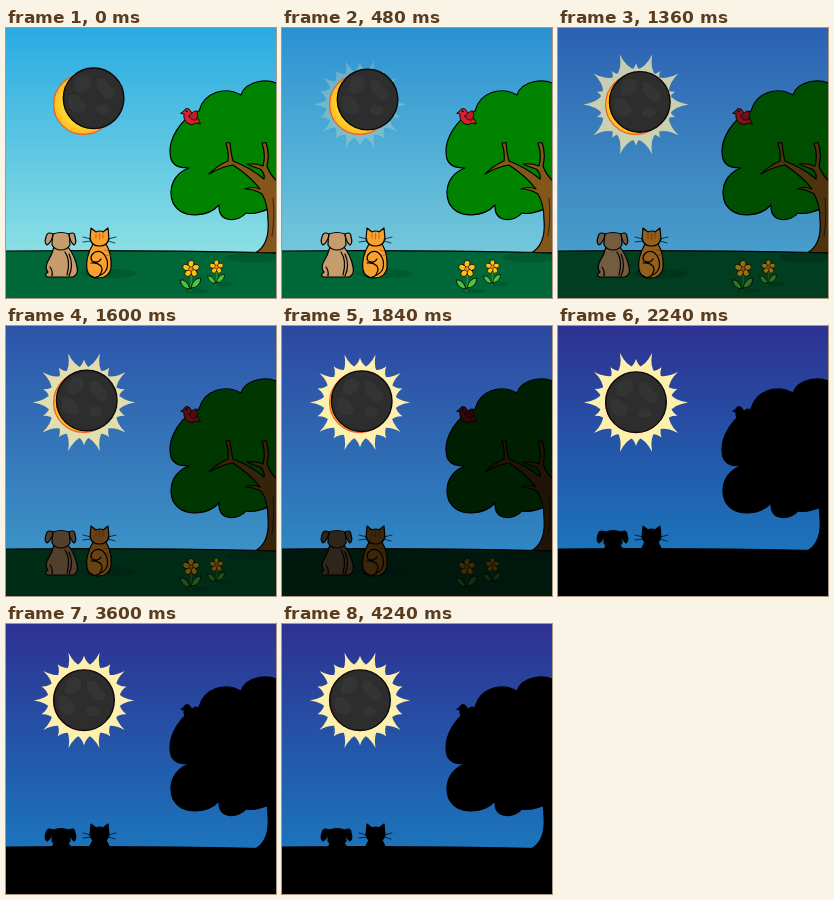
These frames come from a looping animation (270x270 px, 4.32 s). An HTML page:

```html
<!DOCTYPE html>
<html lang="en">
<head>
<meta charset="utf-8">
<title>Eclipse</title>
<style>
html, body { margin: 0; height: 100%; overflow: hidden; background: #000; }
svg { display: block; width: 100vw; height: 100vh; }
#land { stroke: #000; stroke-width: 1.2; stroke-linejoin: round; stroke-linecap: round; }
.shade { fill: #005a30; stroke: none; }
.line { fill: none; }
.dog { fill: #c69c6d; }
.cat { fill: #f9a12f; }
.stripe { fill: none; stroke: #d9691a; }
.leaf { fill: #4cc43c; stroke-width: .8; }
.petal { fill: #fcc21b; stroke-width: .7; }
</style>
</head>
<body>
<svg viewBox="0 0 270 270">
  <defs>
    <linearGradient id="daySky" x2="0" y2="1">
      <stop stop-color="#29abe2"/><stop offset="1" stop-color="#8cdfe3"/>
    </linearGradient>
    <linearGradient id="nightSky" x2="0" y2="1">
      <stop stop-color="#2e3192"/><stop offset="1" stop-color="#1b75bc"/>
    </linearGradient>
    <radialGradient id="sunFill">
      <stop offset=".75" stop-color="#ffd52b"/><stop offset="1" stop-color="#ffb81f"/>
    </radialGradient>
    <path id="ray" d="M-10-33Q-2-38 0-52Q2-38 10-33Z"/>
    <path id="spike" d="M-9-33Q-2-36 0-43.500Q2-36 9-33Z"/>
    <g id="flower">
      <path class="line" d="M0 4Q1 14-1 22" style="stroke:#2f8f22;stroke-width:1.6"/>
      <path class="leaf" d="M-1 20Q-4 10-11 11Q-9 20-1 20Z"/>
      <path class="leaf" d="M0 19Q2 9 10 9Q9 19 0 19Z"/>
      <g id="petals"></g>
      <circle r="2.300" fill="#f08a1c" stroke-width=".4"/>
    </g>
  </defs>

  <rect width="270" height="226" fill="url(#daySky)"/>
  <rect id="night" width="270" height="226" fill="url(#nightSky)"/>

  <g id="corona" fill="#fdf0ae">
    <circle r="35"/>
    <g id="spikes"></g>
    <g id="rays"></g>
  </g>
  <circle cx="77.6" cy="76.4" r="30" fill="url(#sunFill)" stroke="#f15a24" stroke-width="1.2"/>
  <g id="moon">
    <circle r="30.3" fill="#2d2d2d" stroke="#0b0808" stroke-width="1.4"/>
    <g fill="#333534">
      <path d="M-17-20Q-8-27-3-19Q-1-11-8-8Q-15-3-20-9Z"/>
      <path d="M3-19Q12-22 15-13Q22-10 21-2Q14 4 9-4Q1-8 3-19Z"/>
      <path d="M-25-3Q-16-6-12 2Q-5 7-10 13Q-20 17-25 8Z"/>
      <ellipse cx="9" cy="11" rx="7" ry="5"/>
    </g>
  </g>

  <g id="land">
    <path fill="#006838" d="M-2 223Q130 221.500 272 225V273H-2Z"/>
    <ellipse class="shade" cx="102" cy="245.500" rx="28" ry="5"/>
    <ellipse class="shade" cx="249" cy="229.500" rx="29" ry="5"/>
    <ellipse class="shade" cx="191" cy="263" rx="12" ry="2.500"/>
    <ellipse class="shade" cx="217" cy="256" rx="10" ry="2.200"/>

    <path fill="#008400" d="M274 57C262 49 239 53 235 67C219 58 198 64 193 83
      C176 89 160 112 165 131C168 140 178 140 183 140C169 145 161 159 167 175
      C177 193 203 188 213 177C212 196 233 194 240 185C249 187 258 183 274 176Z"/>
    <path fill="#855619" d="M250 224.500Q264 216 262 192Q262 176 256 166Q248 161 239 161Q247 158 254 161
      Q244 148 227 137Q215 139 203 146Q212 137 222 133Q223 124 220 115L224 114.500Q225 126 227 133
      Q245 140 258 151Q259 145 254 141Q247 139 241 136Q250 135 257 138Q260 127 256 115
      L260 114.500Q264 126 261 138Q264 147 272 154V225Z"/>
    <path class="line" d="M267 170Q269 190 266 208" stroke-width=".6"/>

    <g stroke-width=".9">
      <path fill="#d8232e" d="M175 85L178 83Q179 79.500 183 81Q186 86 190 88Q192 90 194.500 96L190 95
        Q186 98 182 95.500Q177 92 178 86.500Z"/>
      <path fill="#c11b28" d="M183 88Q188 82 191 83Q193 88 190 92Q185 93 183 88Z" stroke-width=".7"/>
      <circle cx="180.500" cy="83.300" r=".5" fill="#000"/>
    </g>

    <g class="dog">
      <path d="M48 219Q46 227 41 235Q39 241 42 244Q37 248 42 249H67Q73 246 71 239Q69 228 62 219Z"/>
      <path d="M47 206Q55 203 63 206Q64 211 64 217Q61 222 55 222Q49 222 46 217Q46 211 47 206Z"/>
      <path d="M47 206Q41 203 40 209Q38 215 41 217Q46 214 47 206Z"/>
      <path d="M63 206Q69 203 69 209Q71 215 68 217Q64 214 63 206Z"/>
      <path class="line" d="M59 224Q65 233 61 247M63 226Q68 237 63 248M44 239Q47 243 46 248"/>
    </g>

    <g class="cat">
      <path d="M87 216Q79 230 81 242Q83 250 92 250Q103 250 105 240Q106 226 100 216Z"/>
      <path d="M84 211L85 200L90 204Q94 202 97 204L102 200L103 211Q101 218 93.500 218Q86 218 84 211Z"/>
      <path class="stripe" d="M90 206V210M93.500 205V211M97 206V210M98 222L102 223M100 227L104 228"/>
      <path class="line" d="M90 249Q104 245 101 232Q97 221 89 224Q83 228 86 233Q92 236 95 231M92 249Q98 243 95 238Q91 234 85 235"/>
      <path class="line" d="M85 211L77 209M85 213L77 214M102 211L110 209M102 213L109 215" stroke-width=".7"/>
    </g>

    <use href="#flower" x="185" y="241"/>
    <use href="#flower" transform="translate(210.500 239) scale(.82)"/>
  </g>
</svg>
<script>
const LOOP = 4320, STEP = 80, TAU = Math.PI * 2;
const $ = id => document.getElementById(id);
const ramp = (t, from, to) => Math.min(1, Math.max(0, (t - from) / (to - from)));
const mix = (a, b, k) => a + (b - a) * k;

const spin = (count, turn, shape) => Array.from({ length: count },
  (_, i) => `<g transform="rotate(${turn + i * 360 / count})">${shape}</g>`).join('');

$('rays').innerHTML = spin(10, 90, '<use href="#ray"/>');
$('spikes').innerHTML = spin(10, 108, '<use href="#spike"/>');
$('petals').innerHTML = spin(5, 0, '<ellipse class="petal" cy="-4.900" rx="3" ry="3.700"/>');

function draw(t) {
  const pass = ramp(t, 0, 2240);
  const glow = ramp(t, 0, 1840);
  const pulse = Math.cos(TAU * (t - 2720) / 640);

  $('night').setAttribute('opacity', pass);
  $('moon').setAttribute('transform', `translate(${mix(87.6, 78, pass)} ${mix(70.3, 76.2, pass)})`);
  $('corona').setAttribute('opacity', glow);
  $('corona').setAttribute('transform', `translate(78 76.400) scale(${mix(.9, 1, glow)})`);
  $('rays').setAttribute('transform', `scale(${1 + .05 * pulse})`);
  $('spikes').setAttribute('transform', `scale(${1 - .04 * pulse})`);
  $('land').style.filter = `brightness(${1 - ramp(t, 800, 2160)})`;
}

const start = performance.now();
function tick() {
  const t = (performance.now() - start) % LOOP;
  draw(Math.floor(t / STEP) * STEP);
  requestAnimationFrame(tick);
}
tick();
</script>
</body>
</html>
```
